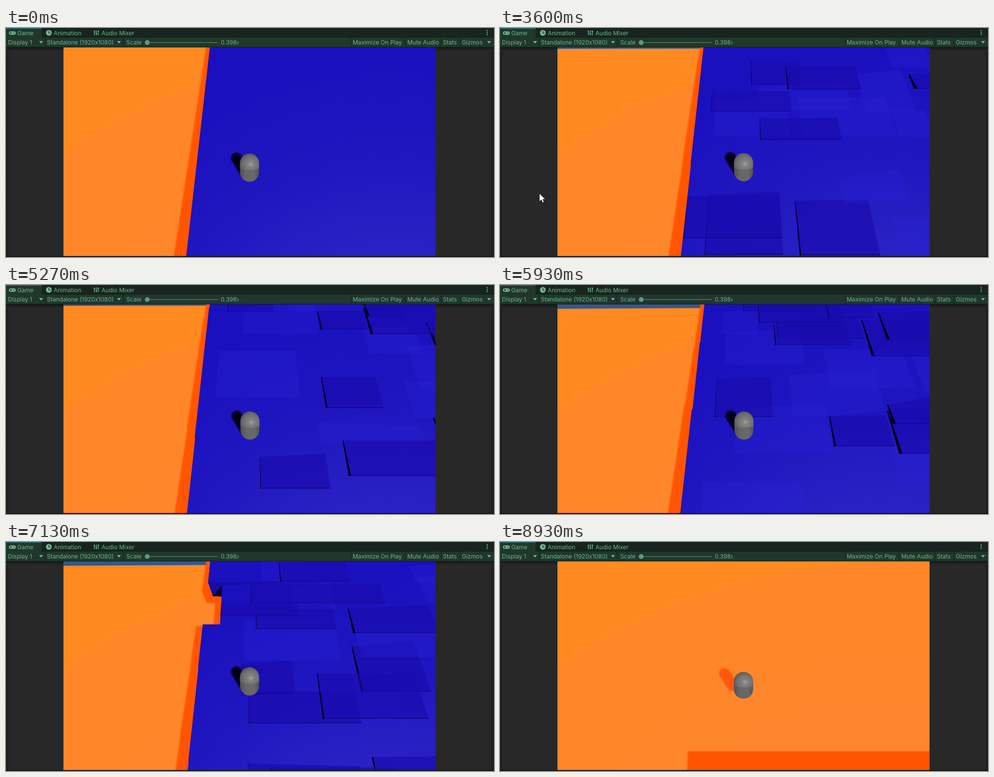
Recreate the animation shown at these times as an HTML page. Size 1002 px wide and 472 px high, loop 8990 ms.

```html
<!DOCTYPE html>
<html lang="en">
<head>
<meta charset="utf-8">
<style>
html, body { margin: 0; width: 100%; height: 100%; overflow: hidden; background: #282828; }
svg { display: block; }
text { font: 12px Inter, sans-serif; fill: #6fb58c; }
</style>
</head>
<body>
<svg width="1002" height="472" viewBox="0 0 1002 472">
  <defs>
    <clipPath id="view"><rect x="118" y="40" width="764" height="430"/></clipPath>
    <radialGradient id="blue" gradientUnits="userSpaceOnUse" cx="800" cy="800" r="800">
      <stop offset=".38" stop-color="#2c24c4"/><stop offset=".65" stop-color="#2017c0"/><stop offset=".95" stop-color="#1a10be"/>
    </radialGradient>
    <radialGradient id="dome" gradientUnits="userSpaceOnUse" cx="503" cy="281" r="24">
      <stop offset="0" stop-color="#a0a0a0"/><stop offset=".25" stop-color="#828282"/><stop offset=".65" stop-color="#707070"/><stop offset="1" stop-color="#565656"/>
    </radialGradient>
    <linearGradient id="body">
      <stop offset="0" stop-color="#505050"/><stop offset=".3" stop-color="#666"/><stop offset=".75" stop-color="#696969"/><stop offset="1" stop-color="#525252"/>
    </linearGradient>
    <linearGradient id="side"><stop offset="0" stop-color="#1c1c1c"/><stop offset="1" stop-color="#282828"/></linearGradient>
    <linearGradient id="sideR"><stop offset="0" stop-color="#282828"/><stop offset="1" stop-color="#1c1c1c"/></linearGradient>
    <linearGradient id="under" x2="0" y2="1"><stop offset="0" stop-color="#161616"/><stop offset="1" stop-color="#282828"/></linearGradient>
    <filter id="soft" filterUnits="userSpaceOnUse" x="100" y="20" width="800" height="470"><feGaussianBlur stdDeviation="1.4"/></filter>
  </defs>

  <rect width="1002" height="472" fill="#282828"/>
  <rect y="40" width="8" height="432" fill="url(#side)"/>
  <rect x="994" y="40" width="8" height="432" fill="url(#sideR)"/>
  <rect y="39" width="1002" height="9" fill="url(#under)"/>
  <rect y="470" width="1002" height="2" fill="#141414"/>

  <g clip-path="url(#view)">
    <rect x="118" y="40" width="764" height="430" fill="#ff8a22"/>
    <g id="bands"></g>
    <path id="sky" fill="#35578c"/>
    <path id="shade" fill="#ff5406" filter="url(#soft)"/>
    <path id="road" fill="url(#blue)"/>
    <g id="slabs"></g>
    <path id="cast" fill="none" stroke-width="22" stroke-linecap="round" filter="url(#soft)"/>
    <g id="player">
      <rect x="480.500" y="259" width="39" height="58" rx="19.500" fill="url(#body)"/>
      <path d="M480.500 289V278.500a19.500 19.500 0 0 1 39 0V289Q500 297 480.500 289Z" fill="url(#dome)"/>
    </g>
  </g>

  <g id="ui">
    <rect width="1002" height="20" fill="#17251e"/>
    <rect width="73" height="20" fill="#20372b"/>
    <rect width="73" height="1.500" fill="#2a6f78"/>
    <rect y="20" width="1002" height="19" fill="#20372b"/>
    <rect y="39" width="1002" height="1" fill="#121a16"/>
    <g fill="#72b78e">
      <rect x="6" y="7" width="14" height="7" rx="3.500"/>
      <circle cx="88" cy="10" r="6"/>
      <path d="M68 27h8l-4 5zM228 27h8l-4 5zM988 27h8l-4 5z"/>
      <circle cx="988" cy="5.500" r="1.200"/><circle cx="988" cy="9.500" r="1.200"/><circle cx="988" cy="13.500" r="1.200"/>
    </g>
    <path d="M8 10.500h4M10 8.500v4M88 6v4.500h3.500" fill="none" stroke="#20372b" stroke-width="1.400"/>
    <path d="M15 10.500h2" stroke="#20372b" stroke-width="2"/>
    <path d="M181.500 5v10M185.500 5v10M189.500 5v10M180 8h3M184 12h3M188 7h3" fill="none" stroke="#72b78e" stroke-width="1.400"/>
    <path d="M290 30h145" stroke="#426a53" stroke-width="2"/>
    <circle cx="290" cy="30" r="5" fill="#5f9a78"/>
    <path id="rules" stroke="#14211a"/>
    <svg x="441" y="20" width="36.500" height="19"><text y="14">0.398x</text></svg>
  </g>
  <path id="cursor" d="M0 0V16.500L4 13L6.500 19L9.500 17.700L7 12H12Z" fill="#fff" stroke="#111" stroke-width=".8"/>
</svg>

<script>
const NS = 'http://www.w3.org/2000/svg';
const LOOP = 8990, GO = 2470, LAST = 7800, DROP = 8560;
const VX = 505, VY = -750;                // vanishing point
const FAR = 1 / (40 - VY), NEAR = 1 / (470 - VY);
const SPEED = (FAR - NEAR) / 1115;        // one screen of road per 1115 ms
const EDGE = -0.111;

const $ = id => document.getElementById(id);
const set = (id, attrs) => { for (const k in attrs) $(id).setAttribute(k, attrs[k]); };
const clamp = v => Math.min(1, Math.max(0, v));
const mix = (a, b, k) => a + (b - a) * k;
const travel = t => Math.max(0, t - GO) * SPEED;

function add(parent, tag, attrs) {
  const el = document.createElementNS(NS, tag);
  for (const k in attrs) el.setAttribute(k, attrs[k]);
  return parent.appendChild(el);
}

let seed = 11;
const rnd = () => (seed = seed * 16807 % 2147483647) / 2147483647;

function label(x, y, s) { add($('ui'), 'text', { x, y }).textContent = s; }
label(23, 15, 'Game'); label(98, 15, 'Animation'); label(196, 15, 'Audio Mixer');
label(4, 34, 'Display 1'); label(84, 34, 'Standalone (1920x1080)'); label(247, 34, 'Scale');
label(712, 34, 'Maximize On Play'); label(824, 34, 'Mute Audio');
label(897, 34, 'Stats'); label(936, 34, 'Gizmos');
set('rules', { d: [80, 240, 708, 819, 893, 932].map(x => `M${x + .5} 20v19`).join('') });

for (let i = 0; i < 5; i++) {
  const ry = 722 * .85 ** i;
  add($('bands'), 'ellipse', { cx: 840, cy: 760, rx: ry * 1.39, ry, fill: `rgb(255 ${135 - i / 4} ${40 + i * 1.5})` });
}

// A world point is a ray from the vanishing point (r) and a depth (q).
const world = (x, y, t) => ({ r: (x - VX) / (y - VY), q: 1 / (y - VY) + travel(t) });
function project({ r, q }, gone) {
  const d = 1 / Math.max(q - gone, 1 / 1500);
  return [VX + r * d, VY + d];
}
const outline = pts => 'M' + pts.map(p => p[0].toFixed(1) + ' ' + p[1].toFixed(1)).join('L') + 'Z';

const shapes = [];
function shape(fill, opacity, ...points) {
  shapes.push({ el: add($('slabs'), 'path', { fill, 'fill-opacity': opacity }), points });
}

// A plate between two rays and two depths; raised ones get a dark left side and front lip.
function slab(l, r, far, near, raised, skew = 0) {
  const pt = (r, q) => ({ r, q }), k = .0008 + Math.max(0, l) * .02;
  shape(raised ? '#190cae' : '#2a21d0', raised ? .65 : .35, pt(l, far), pt(r, far + skew), pt(r, near), pt(l, near));
  if (!raised) return;
  const lip = near + 1.6e-6;
  shape('#140a90', 1, pt(l, lip), pt(r, lip), pt(r, near), pt(l, near));
  shape('#04011f', 1, pt(l, far), pt(l + k * .4, far), pt(l + k, near), pt(l, near));
}

function plate(t, x, y, w, h, raised = true) {
  const a = world(x, y, t), b = world(x + w, y, t);
  slab(a.r, b.r, a.q, world(x, y + h, t).q, raised);
}

// Scattered plates along the whole road.
const END = FAR + travel(LAST), ROW = (FAR - NEAR) / 7;
for (let q = FAR; q < END - ROW; q += ROW) {
  for (let r = -.07 + rnd() * .1; r < .45;) {
    const w = .07 + rnd() * .14, near = q + rnd() * ROW * .4;
    if (rnd() < .6) slab(r, r + w, near + ROW * (.6 + rnd()), near, rnd() < .45, (rnd() - .3) * ROW * .4);
    r += w + rnd() * .06;
  }
}

// The few large plates that stand out.
plate(3600, 436, 130, 158, 42);
plate(3600, 586, 79, 143, 47);
plate(3600, 533, 185, 160, 45);
plate(3600, 386, 346, 188, 87);
plate(5270, 437, 135, 157, 96, false);
plate(5270, 691, 320, 200, 73);
plate(6530, 535, 190, 200, 92);
plate(6530, 576, 289, 188, 66);
plate(6530, 612, 70, 160, 59);
plate(LAST, 575, 255, 175, 64);
plate(LAST, 502, 327, 340, 68);
plate(LAST, 423, 395, 203, 43);

// Left rim: slightly stepped, then narrow with one block standing out.
const rim = [{ r: EDGE, q: 0 }];
for (let q = FAR; q < NEAR + travel(LAST); q += ROW * 2.5) {
  const r = EDGE + rnd() * .003;
  rim.push({ r, q }, { r, q: Math.min(q + ROW * 2.4, NEAR + travel(LAST)) });
}
const at = (x, y) => world(x, y, LAST);
const corner = at(389, 322), foot = at(401, 370), inner = at(424, 371);
rim.push(at(418, 470), inner, foot, corner, at(410, 117), at(442, 117), at(440, 40), at(1400, 40), { r: .8, q: 0 });
shape('#170da4', 1, corner, at(577, 320), at(577, 324), at(426, 333), inner, foot);
shape('#04011f', 1, at(426, 333), inner, foot);

function draw(t) {
  const gone = travel(t), edge = rim.map(p => project(p, gone));
  set('road', { d: outline(edge) });
  set('shade', { d: outline(edge.map(([x, y]) => [x - (y - VY) * .015, y + 13 - (y - 117) * .17])) });
  for (const s of shapes) s.el.setAttribute('d', outline(s.points.map(p => project(p, gone))));

  const sky = t < 3400 || t > DROP ? 0 : t < 5900 ? 3 : 9;
  set('sky', { d: sky ? `M118 40H450V${40 + sky * .8}L118 ${40 + sky}Z` : '' });

  const fall = clamp((t - DROP) / 160);
  const bob = 1.9 * Math.sin((t - 4150) / 875) * clamp((t - GO) / 1000) * (1 - fall);
  const sway = Math.max(0, bob) / 2, squash = 1 - fall * .05;
  set('player', { transform: `translate(${sway} ${bob + 9 * fall + 259 * (1 - squash)})scale(1 ${squash})` });
  set('cast', {
    d: `M${mix(473, 461, fall) + sway} ${mix(268, 271, fall) + bob}L${mix(491, 477, fall) + sway} ${mix(298, 296, fall) + bob}`,
    stroke: t > DROP ? '#ff5408' : '#03011f'
  });

  const drift = (t - 3600) / 100;
  set('cursor', {
    visibility: t >= 3400 && t < 3930 ? 'visible' : 'hidden',
    transform: `translate(${81 - drift * 8} ${341 + drift * 4})`
  });
}

const start = performance.now();
function tick() {
  draw((performance.now() - start) % LOOP);
  requestAnimationFrame(tick);
}
tick();
</script>
</body>
</html>
```
